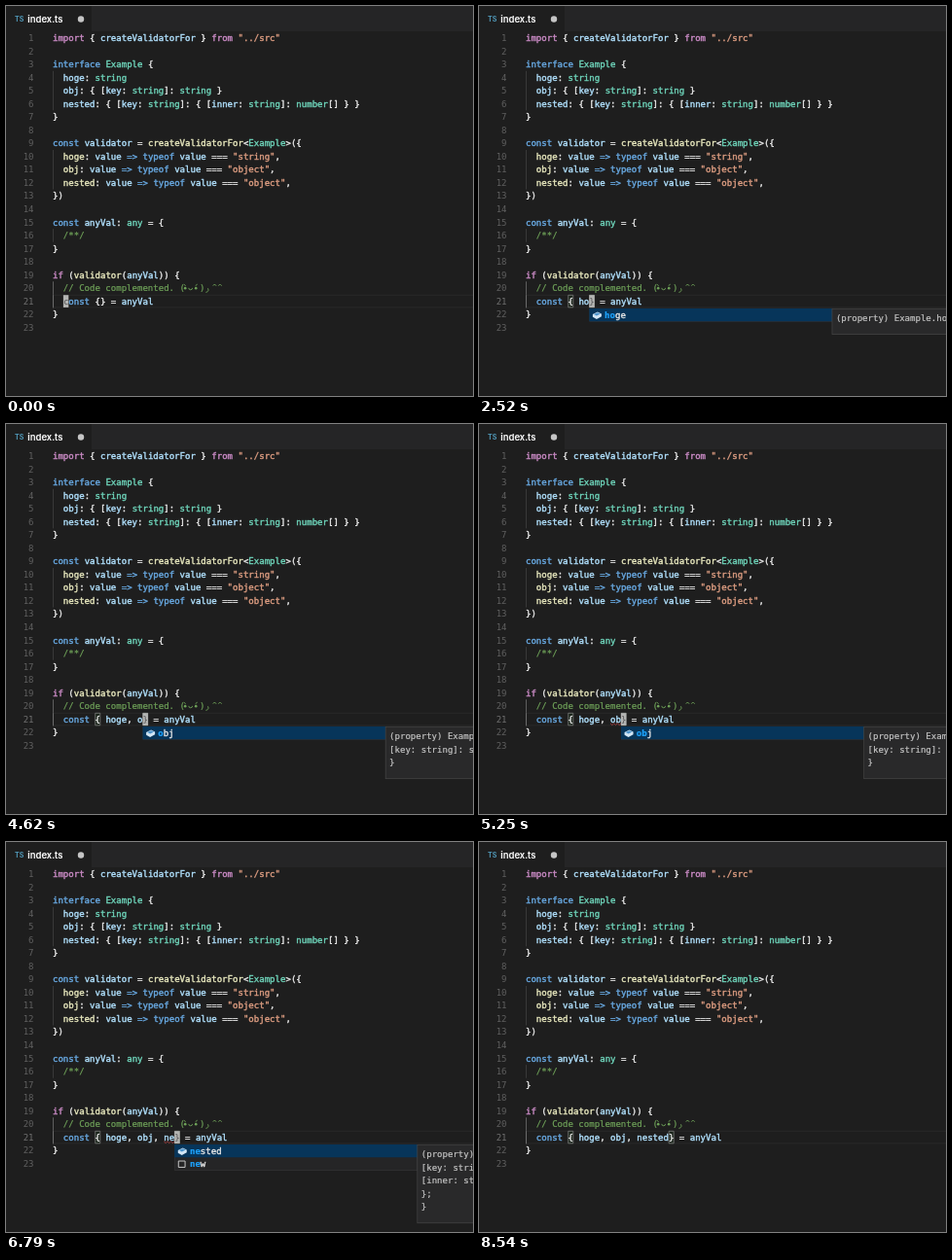
An HTML page with a canvas that plays this animation: 480x401 px, repeating every 8610 ms.

```html
<!DOCTYPE html>
<html lang="en">
<head>
<meta charset="utf-8">
<title>index.ts</title>
<style>
html, body { margin: 0; width: 100%; height: 100%; overflow: hidden; background: #1e1e1e; }
canvas { display: block; width: 480px; height: 401px; }
</style>
</head>
<body>
<canvas id="stage"></canvas>
<script>
const W = 480, H = 401, LOOP = 8610;
const LEFT = 48, CELL = 5.442, TOP = 26.2, LINE = 13.53;
const MONO = '"DejaVu Sans Mono", "Liberation Mono", monospace';
const CODE_FONT = `9.04px ${MONO}`;
const HEAVY = 0.4;
const CURSOR = '#b4b5b3', PANEL = '#252526', DOC_PANEL = '#29292a';

const colors = {
  d: '#eaeaea', k: '#cb8bc6', b: '#68a9e2', v: '#b0e0fd',
  t: '#6ed4ba', s: '#dc9c80', f: '#e8e8be', c: '#6fa259'
};

// Each "~" starts a token; the letter after it picks the colour.
const code = [
  '~kimport~d { ~vcreateValidatorFor~d } ~kfrom ~s"../src"',
  '',
  '~binterface ~tExample~d {',
  '~v  hoge~d: ~tstring',
  '~v  obj~d: { [~vkey~d: ~tstring~d]: ~tstring~d }',
  '~v  nested~d: { [~vkey~d: ~tstring~d]: { [~vinner~d: ~tstring~d]: ~tnumber~d[] } }',
  '~d}',
  '',
  '~bconst ~vvalidator~d = ~fcreateValidatorFor~d<~tExample~d>({',
  '~f  hoge~d: ~vvalue ~b=> typeof ~vvalue~d === ~s"string"~d,',
  '~f  obj~d: ~vvalue ~b=> typeof ~vvalue~d === ~s"object"~d,',
  '~f  nested~d: ~vvalue ~b=> typeof ~vvalue~d === ~s"object"~d,',
  '~d})',
  '',
  '~bconst ~vanyVal~d: ~tany~d = {',
  '~c  /**/',
  '~d}',
  '',
  '~kif~d (~fvalidator~d(~vanyVal~d)) {',
  '~c  // Code complemented. (',
  '',
  '~d}',
  ''
];

// [time, typed text, cursor column when not at the closing brace]
const steps = [
  [0, '', 2], [560, '', 8], [1050, ''],
  [1890, ' '], [2030, ' h'], [2240, ' ho'],
  [3000, ' hoge'], [3220, ' hoge,'], [3360, ' hoge, '],
  [4620, ' hoge, o'], [4830, ' hoge, ob'],
  [5530, ' hoge, obj'], [5740, ' hoge, obj,'], [5880, ' hoge, obj, '],
  [6300, ' hoge, obj, n'], [6450, ' hoge, obj, ne'],
  [7000, ' hoge, obj, nested']
];

// [from, until, column, length]
const squiggles = [[3070, 4200, 10, 3], [4970, 5530, 16, 2], [6590, 7000, 21, 2]];

const menus = [
  { items: ['hoge'], docs: ['(property) Example.hoge: string'] },
  { items: ['obj'], docs: ['(property) Example.obj: {', '[key: string]: string;', '}'] },
  { items: ['nested', 'new'],
    docs: ['(property) Example.nested: {', '[key: string]: {', '[inner: string]: number[];', '};', '}'] }
];

const canvas = document.getElementById('stage');
const ctx = canvas.getContext('2d');
const scale = window.devicePixelRatio || 1;
canvas.width = W * scale;
canvas.height = H * scale;
ctx.lineJoin = 'round';

const colX = col => LEFT + col * CELL;
const lineY = n => TOP + (n - 1) * LINE;
const baseY = n => lineY(n) + 9.9;

function rect(x, y, w, h, fill) {
  ctx.fillStyle = fill;
  ctx.fillRect(x, y, w, h);
}

// A thin outline in the same colour thickens the strokes of the letters.
function text(str, x, y, fill, font = CODE_FONT, weight = 0) {
  ctx.font = font;
  ctx.fillStyle = ctx.strokeStyle = fill;
  ctx.fillText(str, x, y);
  if (weight) {
    ctx.lineWidth = weight;
    ctx.strokeText(str, x, y);
  }
}

function panel(x, y, w, h, edge, fill) {
  rect(x, y, w, h, edge);
  rect(x + 0.7, y + 0.7, w - 1.4, h - 1.4, fill);
}

function path(points, stroke, width) {
  ctx.beginPath();
  points.forEach(([x, y]) => ctx.lineTo(x, y));
  ctx.strokeStyle = stroke;
  ctx.lineWidth = width;
  ctx.stroke();
}

function polygon(points, x, y, fill) {
  ctx.beginPath();
  points.forEach(([dx, dy]) => ctx.lineTo(x + dx, y + dy));
  ctx.fillStyle = fill;
  ctx.fill();
}

function dot(x, y, r, fill) {
  ctx.beginPath();
  ctx.arc(x, y, r, 0, Math.PI * 2);
  ctx.fillStyle = fill;
  ctx.fill();
}

function arc(x, y, r, from, to) {
  ctx.beginPath();
  ctx.arc(x, y, r, from * Math.PI, to * Math.PI);
  ctx.strokeStyle = colors.c;
  ctx.lineWidth = 0.9;
  ctx.stroke();
}

function tokens(markup, n) {
  let col = 0;
  for (const part of markup.split('~').slice(1)) {
    const str = part.slice(1);
    const weight = part[0] === 'c' ? HEAVY / 2 : HEAVY;
    text(str, colX(col), baseY(n), colors[part[0]], CODE_FONT, weight);
    col += str.length;
  }
}

function tabBar() {
  rect(88, 0, W - 88, 26, PANEL);
  text('TS', 9, 16.4, '#519aba', 'bold 7px Inter, sans-serif');
  text('index.ts', 22.3, 17, '#ffffff', '500 9.6px Inter, sans-serif', 0.2);
  dot(77, 13.5, 3.2, '#c5c5c5');
}

function gutter() {
  ctx.textAlign = 'right';
  code.forEach((_, i) => text(i + 1, 28.5, baseY(i + 1), i === 20 ? '#707070' : '#606060'));
  ctx.textAlign = 'left';
  for (const [from, to] of [[4, 6], [10, 12], [16, 16], [20, 21]]) {
    rect(LEFT, lineY(from), 0.8, (to - from + 1) * LINE, from === 20 ? '#707070' : '#404040');
  }
}

function face() {
  const y = baseY(20) - 3;
  dot(184.2, y, 1.3, colors.c);
  dot(195.2, y, 1.3, colors.c);
  path([[182.7, y - 4], [184.7, y - 2.6]], colors.c, 0.9);
  path([[196.7, y - 4], [194.7, y - 2.6]], colors.c, 0.9);
  arc(189.7, y - 0.3, 1.9, 0, 1);
  text(')', 199, baseY(20), colors.c, CODE_FONT, HEAVY / 2);
  arc(205.4, y + 1.6, 2.6, -0.2, 0.5);
  arc(214.4, y - 2, 1.7, 1.1, 1.9);
  arc(220, y - 2, 1.7, 1.1, 1.9);
}

function bracketBox(col) {
  const x = colX(col), y = lineY(21);
  rect(x, y, CELL, LINE, 'rgba(0, 100, 0, 0.1)');
  ctx.strokeStyle = '#888888';
  ctx.lineWidth = 0.7;
  ctx.strokeRect(x + 0.2, y + 0.5, CELL - 0.4, LINE - 1);
}

function squiggle(col, length) {
  const points = [];
  const y = lineY(21) + 11.9;
  for (let i = 0; i <= length * 3; i++) {
    points.push([colX(col) + i * CELL / 3, y + (i % 2 ? 0.9 : -0.9)]);
  }
  path(points, '#d04545', 0.7);
}

function fieldIcon(x, y) {
  polygon([[0, 3], [5, 0.5], [9, 2.5], [9, 5.2], [4, 8], [0, 5.8]], x, y, '#d3e6f5');
  polygon([[1, 3], [5, 1.2], [8, 2.6], [4, 4.6]], x, y, '#4c94cc');
}

function keywordIcon(x, y) {
  ctx.strokeStyle = '#c5c5c5';
  ctx.lineWidth = 1;
  ctx.strokeRect(x + 0.5, y + 0.8, 6.8, 6.4);
}

function popup(menu, word, col) {
  const x = colX(col), y = lineY(22) + 0.6, width = 250, row = 13.3;
  panel(x, y, width, menu.items.length * row + 0.4, '#333335', PANEL);
  rect(x, y, width, row, '#07355a');
  menu.items.forEach((item, i) => {
    const rowY = y + i * row;
    const labelX = x + 15.8, labelY = rowY + 10.1;
    (i ? keywordIcon : fieldIcon)(x + 3.6, rowY + 3);
    text(word, labelX, labelY, '#1ea2fb', `bold 9.04px ${MONO}`, 0.2);
    text(item.slice(word.length), labelX + word.length * CELL, labelY, '#e6e6e6', CODE_FONT, HEAVY);
  });
  const docX = x + width - 0.7;
  panel(docX, y, 300, (menu.docs.length + 1) * LINE, '#454545', DOC_PANEL);
  menu.docs.forEach((line, i) =>
    text(line, docX + 4.3, y + 13.4 + i * LINE, '#c4c4c4', CODE_FONT, HEAVY / 2));
}

function activeLine(time) {
  const [since, typed, fixedCol] = steps.filter(s => s[0] <= time).pop();
  const close = 9 + typed.length;
  const cursor = fixedCol ?? close;
  const y = lineY(21);

  rect(LEFT, y, W - LEFT, 0.8, '#2c2c2c');
  rect(LEFT, y + LINE - 0.8, W - LEFT, 0.8, '#2c2c2c');
  rect(LEFT, y, 0.8, LINE, '#707070');
  if (cursor >= 8) [8, close].forEach(bracketBox);

  const names = typed.replace(/(\w+)/g, '~v$1~d');
  tokens(`~b  const ~d{${names}} = ~vanyVal`, 21);
  for (const [from, until, col, length] of squiggles) {
    if (time >= from && time < until) squiggle(col, length);
  }

  if ((time - since) % 1000 < 500) {
    const char = `  const {${typed}}`[cursor];
    rect(colX(cursor), y + 0.4, CELL, LINE - 0.8, CURSOR);
    text(char, colX(cursor), baseY(21), '#515052');
  }

  const word = (typed.match(/\w+$/) || [''])[0];
  const menu = word && word.length < 3 && menus.find(m => m.items[0].startsWith(word));
  if (menu) popup(menu, word, cursor);
}

function draw(time) {
  ctx.setTransform(scale, 0, 0, scale, 0, 0);
  rect(0, 0, W, H, '#1e1e1e');
  tabBar();
  gutter();
  code.forEach((line, i) => tokens(line, i + 1));
  face();
  activeLine(time);
}

const start = performance.now();
function frame() {
  draw((performance.now() - start) % LOOP);
  requestAnimationFrame(frame);
}
frame();
</script>
</body>
</html>
```
